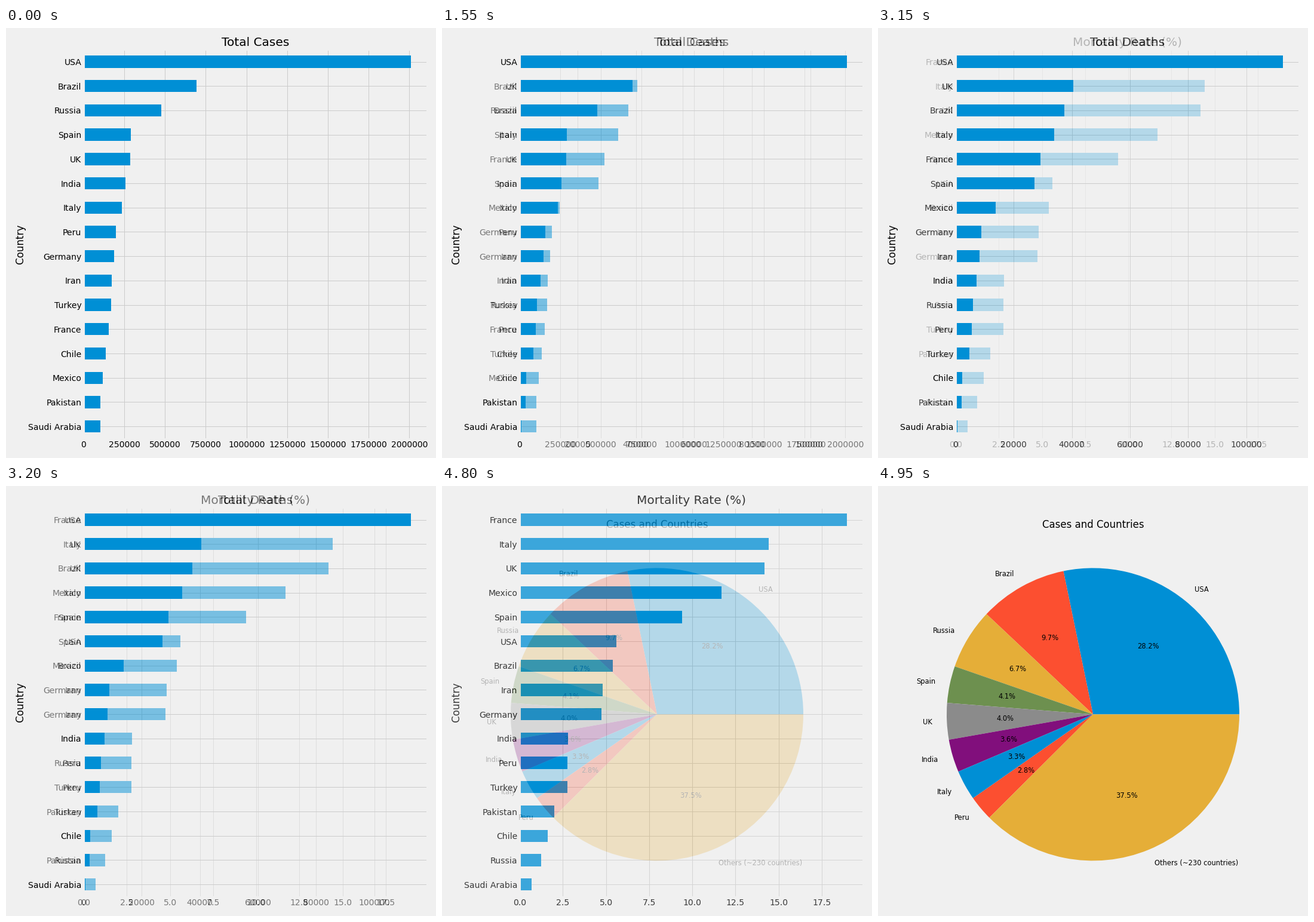
A matplotlib script that plays this animation: 720 by 720 pixels, repeating every 6450 ms.

```python
import matplotlib.pyplot as plt
import numpy as np
from matplotlib.animation import FuncAnimation
from matplotlib.patches import Rectangle

SIZE, DPI = 720, 72
STEP_MS = 50
HOLD, FADE = 30, 3              # steps a slide stays, steps of cross-fade
BACK, GRID, BLUE = "#f0f0f0", "#cbcbcb", "#008fd5"
WHEEL = [BLUE, "#fc4f30", "#e5ae38", "#6d904f", "#8b8b8b", "#810f7c"]
WORLD_CASES = 7_108_000

plt.rcParams.update({
    "font.family": "DejaVu Sans", "font.size": 14,
    "axes.titlesize": "x-large", "axes.labelsize": "large",
    "axes.edgecolor": BACK, "axes.linewidth": 3, "axes.axisbelow": True,
    "axes.grid": True, "grid.color": GRID, "grid.linewidth": 1,
    "xtick.major.size": 0, "ytick.major.size": 0,
    "figure.facecolor": BACK,
})

# country: (cases, deaths)
DATA = {
    "USA": (2007449, 112469), "Brazil": (691962, 37312),
    "Russia": (476658, 5971), "Spain": (288797, 27136),
    "UK": (286194, 40542), "India": (257486, 7200),
    "Italy": (235278, 33899), "Peru": (196515, 5465),
    "Germany": (185600, 8790), "Iran": (171789, 8281),
    "Turkey": (170132, 4692), "France": (153977, 29155),
    "Chile": (134300, 2190), "Mexico": (117103, 13699),
    "Pakistan": (103671, 2067), "Saudi Arabia": (101914, 712),
}
CASES = {name: c for name, (c, d) in DATA.items()}
DEATHS = {name: d for name, (c, d) in DATA.items()}
RATES = {name: 100 * d / c for name, (c, d) in DATA.items()}

fig = plt.figure(figsize=(SIZE / DPI, SIZE / DPI), dpi=DPI)


def add_slide(left, top, right, bottom):
    """Axes at pixel edges, with a backdrop covering the whole stage."""
    box = [left, SIZE - bottom, right - left, bottom - top]
    ax = fig.add_axes([v / SIZE for v in box], label=f"slide{len(fig.axes)}")
    ax.patch.set_visible(False)
    ax.add_artist(Rectangle((0, 0), 1, 1, transform=fig.transFigure,
                            facecolor=BACK, clip_on=False, zorder=-10))
    return ax


def bar_slide(title, values, step, fmt):
    ax = add_slide(129.9, 36.2, 704.9, 687.5)
    names = sorted(values, key=values.get)
    widths = [values[n] for n in names]
    rows = np.arange(len(names))
    limit = max(widths) * 1.05
    ticks = np.arange(0, limit, step)
    ax.barh(rows, widths, height=0.5, color=BLUE)
    ax.set_xlim(0, limit)
    ax.set_ylim(-0.5, len(names) - 0.5)
    ax.set_xticks(ticks, [format(t, fmt) for t in ticks])
    ax.set_yticks(rows, names)
    ax.set_ylabel("Country")
    ax.set_title(title)
    return ax


def pie_slide(title, values, top_n):
    ax = add_slide(53.75, 76.15, 666.25, 688.65)
    names = sorted(values, key=values.get, reverse=True)[:top_n]
    parts = [values[n] for n in names]
    parts.append(WORLD_CASES - sum(parts))
    names.append("Others (~230 countries)")
    colors = [WHEEL[i % len(WHEEL)] for i in range(len(parts))]
    ax.pie(parts, labels=names, colors=colors, autopct="%1.1f%%",
           textprops={"fontsize": 11.52})
    ax.set_title(title, fontsize=16.59)
    return ax


slides = [
    bar_slide("Total Cases", CASES, 250000, ".0f"),
    bar_slide("Total Deaths", DEATHS, 20000, ".0f"),
    bar_slide("Mortality Rate (%)", RATES, 2.5, ".1f"),
    pie_slide("Cases and Countries", CASES, 8),
]


def opacity(alpha):
    """Filter that fades a whole slide as one layer."""
    def apply(img, dpi):
        img[..., 3] *= alpha
        return img, 0, 0
    return apply


def update(frame):
    index, step = divmod(frame, HOLD + FADE)
    for ax in slides:
        ax.set_visible(False)
        ax.set_agg_filter(None)
    slides[index].set_visible(True)
    if step >= HOLD:
        following = slides[index + 1]
        following.set_visible(True)
        following.set_agg_filter(opacity((step - HOLD + 1) / (FADE + 1)))
    return slides


total = len(slides) * HOLD + (len(slides) - 1) * FADE
anim = FuncAnimation(fig, update, frames=total, init_func=lambda: update(0),
                     interval=STEP_MS, repeat=True, blit=False)
plt.show()
```
